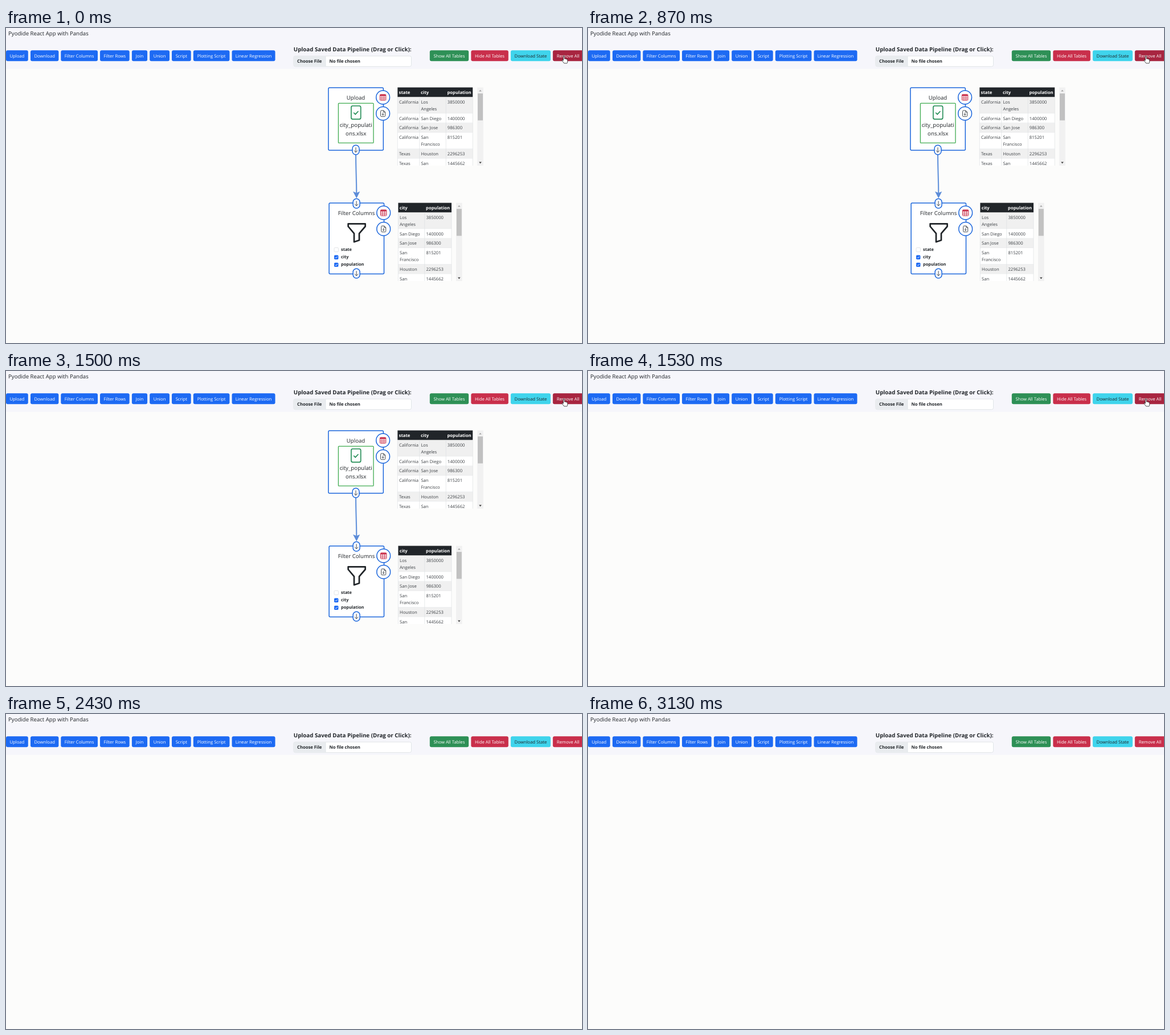
These frames come from a looping animation (1011 by 554 pixels, 3.16 s). An HTML page:

```html
<!DOCTYPE html>
<html lang="en">
<head>
<meta charset="utf-8">
<title>Pyodide React App with Pandas</title>
<style>
  html, body { margin: 0; width: 100%; height: 100%; overflow: hidden; background: #fcfcfb; }
  svg { display: block; width: 1011px; height: 554px; }
  text {
    font: 7.7px "Open Sans", "Noto Sans", sans-serif;
    fill: #212529;
    text-rendering: geometricPrecision;
  }
  text.title { font-size: 9.65px; font-weight: 500; }
  text.head { font-size: 9.75px; font-weight: 700; }
  text.bold { font-weight: 700; }
  text.label { font-size: 7.4px; font-weight: 700; }
  text.file { font-size: 9.7px; }
  text.cell { font-size: 7.65px; fill: #3d4145; }
  text.light { fill: #fff; }
  text.mid { text-anchor: middle; }

  #flow { animation: vanish 3160ms step-end infinite; }
  #cursor { animation: leave 3160ms linear infinite; }
  #remove { animation: unhover 3160ms linear infinite; }

  @keyframes vanish {
    0% { opacity: 1; }
    48.38%, 100% { opacity: 0; }
  }
  @keyframes leave {
    0%, 53% { transform: none; animation-timing-function: ease-in; }
    62% { transform: translate(36px, -56px); opacity: 1; }
    62.1%, 100% { transform: translate(36px, -56px); opacity: 0; }
  }
  @keyframes unhover {
    0%, 58% { fill: #a82540; }
    62.7%, 99.99% { fill: #c92f4b; }
    100% { fill: #a82540; }
  }
</style>
</head>
<body>
<svg id="stage" viewBox="0 0 1011 554" xmlns="http://www.w3.org/2000/svg">
  <defs>
    <g id="port" stroke-linecap="round" stroke-linejoin="round">
      <rect x="-6" y="-8.4" width="12" height="16.8" rx="6" fill="#fff" stroke="#1b66dc" stroke-width="1.5"/>
      <path d="M0-4V4M-2.9 1.2L0 4.1L2.9 1.2" fill="none" stroke="#30363c" stroke-width=".9"/>
    </g>
    <g id="gridButton">
      <circle r="11.9" fill="#fff" stroke="#1b66dc" stroke-width="1.5"/>
      <rect x="-5.2" y="-5.2" width="10.4" height="10.4" rx="1.2" fill="#fff" stroke="#c92f4b"/>
      <path d="M-5-3.6H5" stroke="#c92f4b" stroke-width="2.6"/>
      <path d="M-5 .2H5M-5 2.8H5M-1.8-3V5M1.8-3V5" stroke="#c92f4b" stroke-width=".8"/>
    </g>
    <g id="fileButton">
      <circle r="11.9" fill="#fff" stroke="#1b66dc" stroke-width="1.5"/>
      <path d="M1.2-5.3H-2.8Q-4-5.3-4-4V4Q-4 5.3-2.8 5.3H2.8Q4 5.3 4 4V-2.4ZM1.2-5.3V-2.4H4M0-1.6V2.9M-1.8 1.2L0 3L1.8 1.2"
        fill="none" stroke="#30363c" stroke-width=".9" stroke-linejoin="round"/>
    </g>
  </defs>

  <rect width="1011" height="72" fill="#f6f6fb"/>
  <text class="title" x="4" y="12.8">Pyodide React App with Pandas</text>

  <g id="buttons"></g>

  <text class="head" x="504.8" y="41.2">Upload Saved Data Pipeline (Drag or Click):</text>
  <rect x="504.8" y="49.2" width="206.7" height="18.6" rx="3" fill="#fff" stroke="#dee2e6" stroke-width=".9"/>
  <path d="M561 49.6V67.4H508Q505.2 67.4 505.2 64.6V52.4Q505.2 49.6 508 49.6Z" fill="#e9ecef"/>
  <path d="M561 49.5V67.5" stroke="#dee2e6" stroke-width=".8"/>
  <text class="bold" x="511" y="61.4">Choose File</text>
  <text class="bold" x="567.4" y="61.4">No file chosen</text>

  <g id="flow">
    <path d="M614 222C614 250 615.2 262 615.2 290" fill="none" stroke="#6896dc" stroke-width="2.2"/>
    <path d="M609 287.5L615.2 290L621.2 287.5L615.3 299.5Z" fill="#5c8cd8"/>

    <g fill="#fff" stroke="#1b66dc" stroke-width="1.5">
      <rect x="565.9" y="104.9" width="96.4" height="110.2" rx="2"/>
      <rect x="567.1" y="307.7" width="96.4" height="124.8" rx="2"/>
    </g>

    <text class="title mid" x="614" y="125.6">Upload</text>
    <rect x="583.4" y="132.4" width="61.6" height="69.8" rx="1" fill="#fff" stroke="#3fab50" stroke-width="1.3"/>
    <g fill="none" stroke="#1f8a52" stroke-width="1.6" stroke-linecap="round" stroke-linejoin="round">
      <rect x="605.9" y="137" width="16.8" height="23.4" rx="2.6"/>
      <path d="M610.6 149.3L613.2 151.9L618 146.8"/>
    </g>
    <text class="file mid" x="614.2" y="174.2">city_populati</text>
    <text class="file mid" x="614.2" y="189.2">ons.xlsx</text>

    <text class="title mid" x="615" y="328.6">Filter Columns</text>
    <path d="M600.6 344.4H630.6V349L620 361.4V373.2L611 376.2V361.4L600.6 349Z"
      fill="none" stroke="#212529" stroke-width="2.7" stroke-linejoin="round"/>
    <g id="checks"></g>

    <use href="#gridButton" x="661.6" y="122"/>
    <use href="#fileButton" x="661.6" y="150.4"/>
    <use href="#gridButton" x="662.7" y="325"/>
    <use href="#fileButton" x="662.7" y="353.4"/>
    <use href="#port" x="614" y="214.4"/>
    <use href="#port" x="615.1" y="308.6"/>
    <use href="#port" x="615.1" y="431.6"/>
    <g id="tables"></g>
  </g>

  <g id="cursor">
    <path d="M978.2 50Q978.2 48.8 979.2 48.8Q980.3 48.8 980.3 50V54.2Q982 53.4 982.4 54.6Q984 54 984.2 55.2Q985.7 55 985.7 56.6V59Q985.7 60.6 984.8 62H979.6L976.2 57.6Q975.6 56.4 976.8 56.2L978.2 57.2Z"
      fill="#fff" stroke="#222" stroke-width=".8" stroke-linejoin="round"/>
  </g>
</svg>

<script>
  const NS = "http://www.w3.org/2000/svg";

  function add(parent, tag, attrs, content) {
    const el = document.createElementNS(NS, tag);
    for (const key in attrs) el.setAttribute(key, attrs[key]);
    if (content) el.textContent = content;
    parent.appendChild(el);
    return el;
  }

  const box = (parent, x, y, width, height, fill, rx = 0) =>
    add(parent, "rect", { x, y, width, height, fill, rx });
  const line = (parent, d, stroke = "#dfe1e4") =>
    add(parent, "path", { d, stroke, "stroke-width": .7, fill: "none" });
  const label = (parent, x, y, cls, content) =>
    add(parent, "text", { x, y, class: cls }, content);

  // Toolbar
  const buttons = document.getElementById("buttons");
  function button(x, width, name, fill, cls = "light") {
    const rect = box(buttons, x, 39.2, width, 19, fill, 3);
    label(buttons, x + width / 2, 51.7, "mid " + cls, name);
    return rect;
  }
  [
    [0, 38.8, "Upload"], [43, 49.4, "Download"], [96.3, 64.7, "Filter Columns"],
    [165, 51.7, "Filter Rows"], [220.9, 27.2, "Join"], [252.2, 34.8, "Union"],
    [291, 33.7, "Script"], [328.8, 63.6, "Plotting Script"], [396.5, 76, "Linear Regression"]
  ].forEach(([x, width, name]) => button(x, width, name, "#1d6af3"));
  button(743.8, 68.3, "Show All Tables", "#2e9056");
  button(816.3, 65.5, "Hide All Tables", "#c92f4b");
  button(885.9, 70, "Download State", "#3fd4ec", "");
  button(959.8, 53.4, "Remove All", "#a82540").id = "remove";

  // Column choices
  const checks = document.getElementById("checks");
  ["state", "city", "population"].forEach((name, i) => {
    const y = 386.3 + i * 13.2;
    const mark = box(checks, 576, y, 7.4, 7.4, i ? "#1d6af3" : "#fff", 1.6);
    if (i) {
      add(checks, "path", {
        d: `M577.8 ${y + 3.8}l1.4 1.4l2.6 -2.8`,
        fill: "none", stroke: "#fff", "stroke-width": 1
      });
    } else {
      mark.setAttribute("stroke", "#d5d8dc");
      mark.setAttribute("stroke-width", .7);
    }
    label(checks, 588, y + 5.6, "label", name);
  });

  // Data previews
  const tables = document.getElementById("tables");
  const cities = [
    ["California", "Los|Angeles", "3850000"],
    ["California", "San Diego", "1400000"],
    ["California", "San Jose", "986300"],
    ["California", "San|Francisco", "815201"],
    ["Texas", "Houston", "2296253"],
    ["Texas", "San", "1445662"]
  ];

  function table(top, edges, names, rows, barX) {
    const left = edges[0], right = edges[edges.length - 1], bottom = top + 137.5;
    box(tables, left, top, right - left, 17, "#212529");
    names.forEach((name, i) => label(tables, edges[i] + 2.3, top + 11.5, "bold light", name));

    let y = top + 17;
    rows.forEach((row, r) => {
      const tall = row.some(cell => cell.includes("|"));
      const height = Math.min(tall ? 28.8 : 16.8, bottom - y);
      box(tables, left, y, right - left, height, r % 2 ? "#fff" : "#f0f0f0");
      row.forEach((cell, i) => cell.split("|").forEach((part, n) =>
        label(tables, edges[i] + 2.6, y + 11.2 + n * 12, "cell", part)));
      y += height;
      if (r < rows.length - 1) line(tables, `M${left} ${y}H${right}`);
    });
    edges.forEach(x => line(tables, `M${x} ${top + 17}V${bottom}`));

    box(tables, barX, top, 10.6, 137.5, "#f1f1f1");
    box(tables, barX + .8, top + 10.6, 9, 47.4, "#c1c1c1");
    add(tables, "path", { d: `M${barX + 3} ${top + 7}h4.6l-2.3 -2.8z`, fill: "#a3a3a3" });
    add(tables, "path", { d: `M${barX + 3} ${bottom - 6.4}h4.6l-2.3 2.8z`, fill: "#444" });
  }

  table(104.5, [687.3, 725.8, 772.2, 819.2], ["state", "city", "population"], cities, 827.2);
  table(307.5, [688.4, 734.8, 782], ["city", "population"], cities.map(row => row.slice(1)), 790);
</script>
</body>
</html>
```
